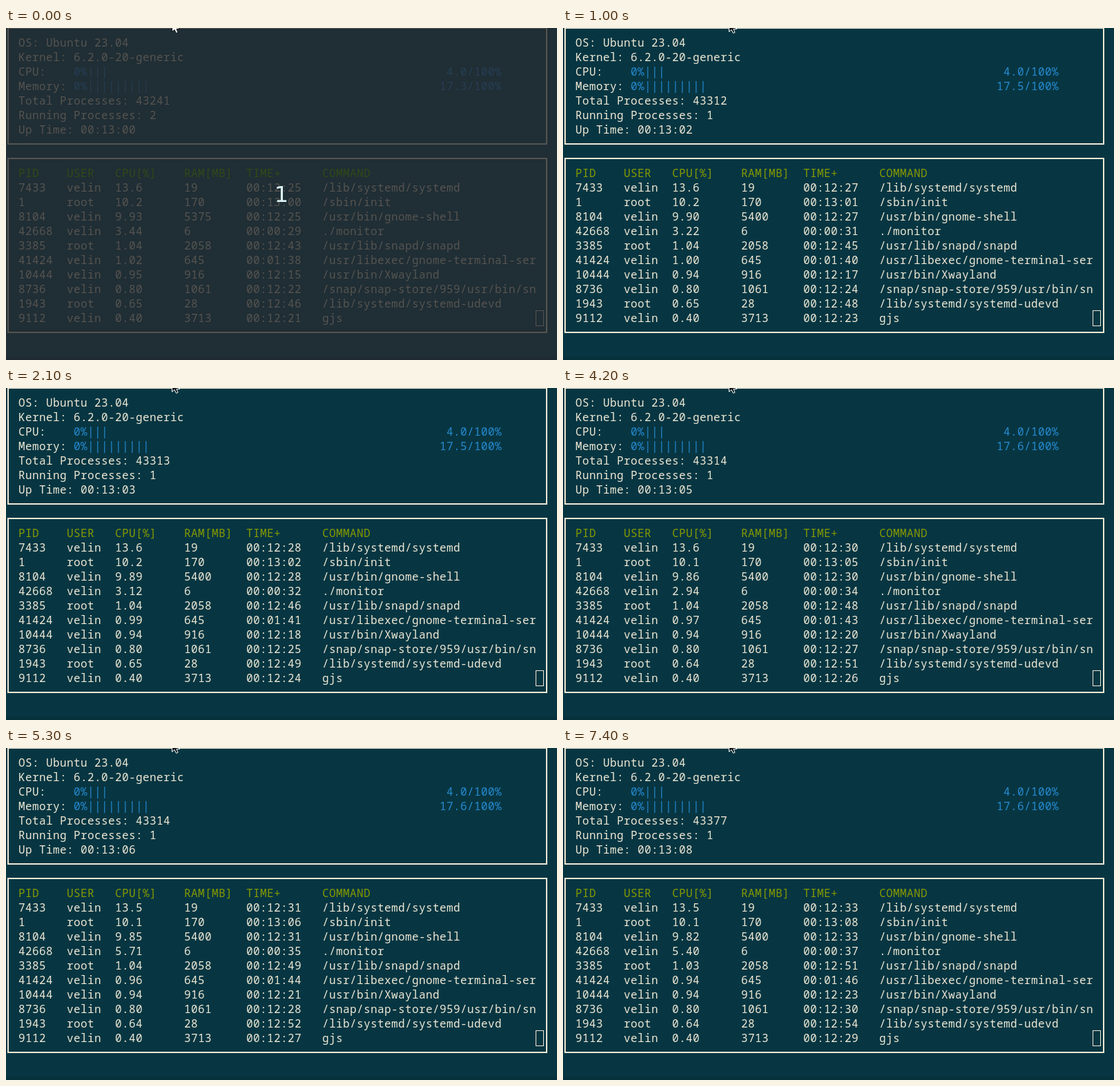
These frames come from a looping animation (798 px wide and 481 px high, 8 s). An HTML page:

```html
<!DOCTYPE html>
<html lang="en">
<head>
<meta charset="utf-8">
<title>System monitor</title>
<style>
  html, body { margin: 0; width: 100%; height: 100%; overflow: hidden; background: #073642; }
  svg {
    display: block; width: 798px; height: 481px;
    --bg: #073642; --edge: #06313c; --fg: #eee8d5; --blue: #268bd2; --green: #859900;
    --arrow: #10181b; --rim: #fff;
  }
  svg.dim {
    --bg: #202e35; --edge: #1f2b32; --fg: #555450; --blue: #263f55; --green: #2f4a17;
    --arrow: #fff; --rim: #10181b;
  }
  text { white-space: pre; fill: var(--fg); font: 16px "Noto Sans Mono", "DejaVu Sans Mono", monospace; letter-spacing: .4px; }
  .blue { fill: var(--blue); }
  .green { fill: var(--green); }
  .box { fill: none; stroke: var(--fg); stroke-width: 2; }
  .caret { fill: none; stroke: var(--fg); }
  .arrow { fill: var(--arrow); stroke: var(--rim); }
  #count { display: none; fill: #dcf4f4; font: 32px "DejaVu Sans", sans-serif; letter-spacing: 0; text-anchor: middle; }
  .dim #count { display: block; }
</style>
</head>
<body>
<svg id="stage" viewBox="0 0 798 481">
  <rect width="798" height="481" fill="var(--bg)"/>
  <rect y="476" width="798" height="5" fill="var(--edge)"/>
  <rect class="box" x="3" y="0" width="780" height="168"/>
  <rect class="box" x="3" y="189" width="780" height="252"/>
  <g id="cells"></g>
  <rect class="caret" x="767.5" y="409.5" width="11" height="22"/>
  <path class="arrow" d="M240.5 -10V5.5L244 2.5L246.5 7.5L249 6.5L247 1.5H251.5Z"/>
  <text id="count" x="399" y="252">1</text>
</svg>
<script>
const LOOP = 8000;
const stage = document.getElementById('stage');
const cells = document.getElementById('cells');

// One entry per refresh: when it happens and what the header shows.
const starts = [0, 1000, 2100, 3100, 4200, 5300, 6300, 7400];
const uptime = [0, 2, 3, 4, 5, 6, 7, 8];
const initUp = [0, 1, 2, 4, 5, 6, 7, 8];
const memory = [17.3, 17.5, 17.5, 17.6, 17.6, 17.6, 17.6, 17.6];
const total = [43241, 43312, 43313, 43314, 43314, 43314, 43377, 43377];
const BOOT = 780;

// pid, user, CPU seconds used, RAM, age at first refresh, command
const procs = [
  [7433, 'velin', 102, 19, 745, '/lib/systemd/systemd'],
  [1, 'root', 80, 170, BOOT, '/sbin/init'],
  [8104, 'velin', 74, 5375, 745, '/usr/bin/gnome-shell'],
  [42668, 'velin', 1, 6, 29, './monitor'],
  [3385, 'root', 8, 2058, 763, '/usr/lib/snapd/snapd'],
  [41424, 'velin', 1, 645, 98, '/usr/libexec/gnome-terminal-ser'],
  [10444, 'velin', 7, 916, 735, '/usr/bin/Xwayland'],
  [8736, 'velin', 6, 1061, 742, '/snap/snap-store/959/usr/bin/sn'],
  [1943, 'root', 5, 28, 766, '/lib/systemd/systemd-udevd'],
  [9112, 'velin', 3, 3713, 741, 'gjs']
];
const columns = [18, 88, 158, 258, 348, 458];

function put(x, row, value = '', cls = '') {
  const el = document.createElementNS('http://www.w3.org/2000/svg', 'text');
  el.setAttribute('x', x);
  el.setAttribute('y', 27 + 21 * row);
  el.setAttribute('class', cls);
  el.textContent = value;
  return cells.appendChild(el);
}

function set(el, value) {
  if (el.textContent !== String(value)) el.textContent = value;
}

const two = n => String(n).padStart(2, '0');
const clock = s => [s / 3600, s / 60 % 60, s % 60].map(v => two(Math.floor(v))).join(':');
const percent = (used, age) => (Math.floor(used * 10000 / age) / 100).toFixed(2).slice(0, 4);

put(18, 0, 'OS: Ubuntu 23.04');
put(18, 1, 'Kernel: 6.2.0-20-generic');
put(18, 2, 'CPU:');
put(98, 2, '0%' + '|'.repeat(3), 'blue');
put(638, 2, '4.0/100%', 'blue');
put(18, 3, 'Memory:');
put(98, 3, '0%' + '|'.repeat(9), 'blue');
const memText = put(628, 3, '', 'blue');
const totalText = put(18, 4);
const runText = put(18, 5);
const upText = put(18, 6);
['PID', 'USER', 'CPU[%]', 'RAM[MB]', 'TIME+', 'COMMAND']
  .forEach((name, i) => put(columns[i], 9, name, 'green'));
const rows = procs.map((p, r) => columns.map(x => put(x, 10 + r)));

function render(ms) {
  const t = ms % LOOP;
  const step = starts.filter(s => s <= t).length - 1;
  stage.classList.toggle('dim', t < 100);
  set(memText, memory[step].toFixed(1) + '/100%');
  set(totalText, 'Total Processes: ' + total[step]);
  set(runText, 'Running Processes: ' + (step ? 1 : 2));
  set(upText, 'Up Time: ' + clock(BOOT + uptime[step]));
  procs.forEach(([pid, user, base, baseRam, age0, command], r) => {
    const age = age0 + (pid === 1 ? initUp : uptime)[step];
    const used = pid === 42668 && step > 4 ? base + 1 : base;
    const ram = pid === 8104 && step ? baseRam + 25 : baseRam;
    [pid, user, percent(used, age), ram, clock(age), command]
      .forEach((value, c) => set(rows[r][c], value));
  });
}

const begin = performance.now();
function tick() {
  render(performance.now() - begin);
  requestAnimationFrame(tick);
}
render(0);
requestAnimationFrame(tick);
</script>
</body>
</html>
```
